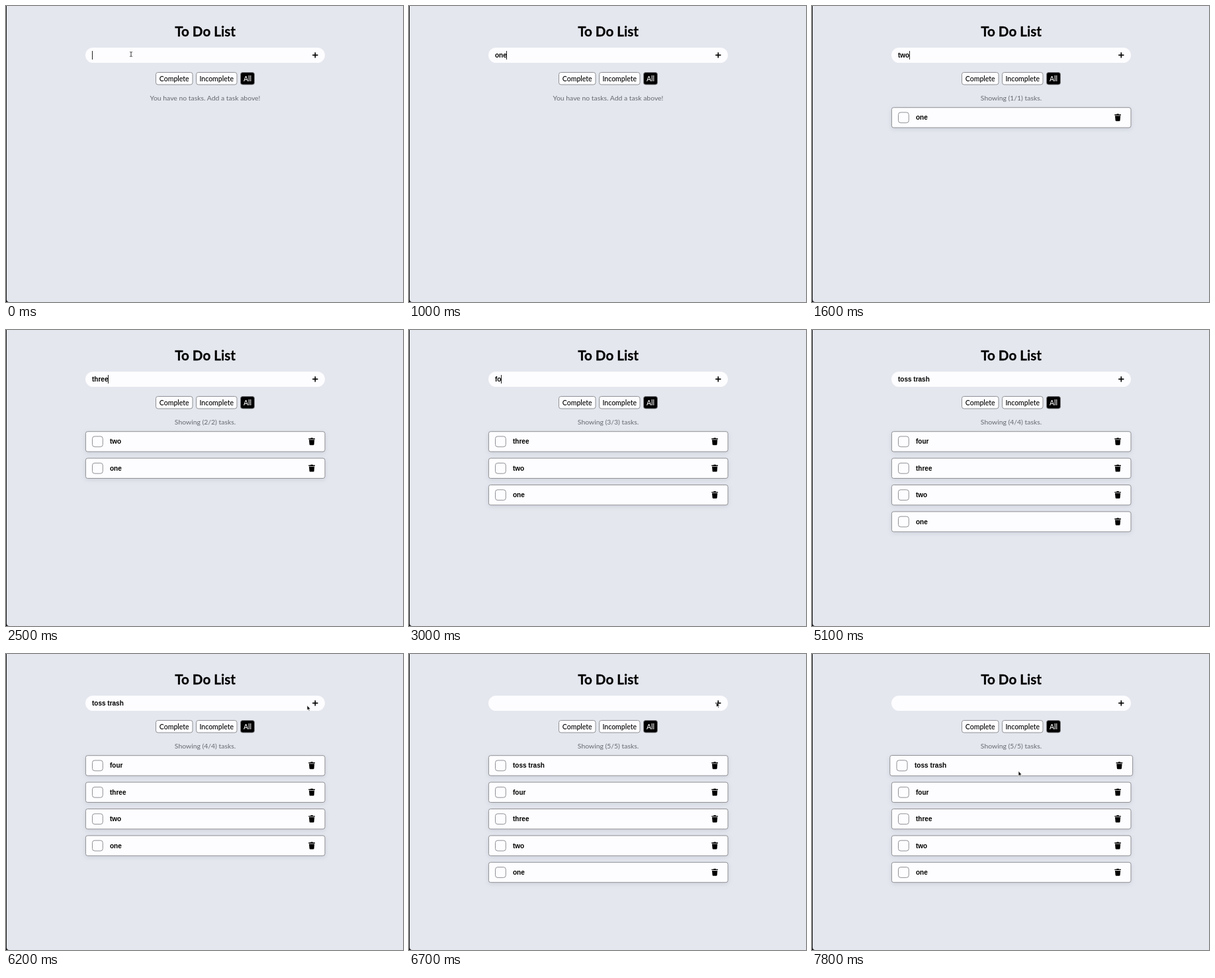
Write an HTML page that moves like this. It is 600x448 px and loops after 8000 ms.

```html
<!DOCTYPE html>
<html lang="en">
<head>
<meta charset="utf-8">
<title>To Do List</title>
<style>
  html, body { margin: 0; width: 100%; height: 100%; overflow: hidden; background: #111; }
  svg { display: block; width: 600px; height: 448px; }
  text { font: 500 10.5px Lato, "Open Sans", sans-serif; fill: #000; white-space: pre; }
  text.title { font-size: 20.6px; font-weight: 700; stroke: #000; stroke-width: .3px; }
  text.status { font-size: 10.4px; font-weight: 400; fill: #666a70; }
  text.task { font: bold 10px "Liberation Sans", Arial, sans-serif; }
  .mid { text-anchor: middle; }
  .box { fill: #fdfcfe; stroke: #85878c; stroke-width: .9px; }
  .card { filter: drop-shadow(0 2px 3px rgba(60, 70, 90, .13)); }
</style>
</head>
<body>
<svg viewBox="0 0 600 448">
  <path d="M1 0H600V448H5Q1 448 1 444Z" fill="#e4e7ee"/>
  <text class="title mid" x="301" y="45.5">To Do List</text>
  <rect x="120" y="63" width="362" height="23" rx="11.5" fill="#fdfcfe"/>
  <path d="M463.2 74.4h8.2M467.3 70.3v8.2" stroke="#000" stroke-width="1.6"/>
  <g id="buttons"></g>
  <text id="status" class="status mid" x="301" y="142.5"></text>
  <g id="list"></g>
  <text id="input" class="task" x="130" y="78"></text>
  <path id="caret" d="M0 68v13" stroke="#222" stroke-width="1"/>
  <path id="beam" d="M-1.8 -3.5Q0 -3.5 0 -2.5Q0 -3.5 1.8 -3.5M0 -2.5V2.5M-1.8 3.5Q0 3.5 0 2.5Q0 3.5 1.8 3.5"
        fill="none" stroke="#222" stroke-width=".9"/>
  <path id="arrow" d="M0 0V7.3L1.7 5.8L2.8 8.4L4 7.9L2.9 5.4H5.2Z" fill="#000" stroke="#fff" stroke-width=".7"/>
</svg>
<script>
const $ = id => document.getElementById(id);
const LOOP = 8000;

// [word, times of its keystrokes, time it is added]
const entries = [
  ["one", [800, 900, 1000], 1100],
  ["two", [1400, 1500, 1600], 1800],
  ["three", [2100, 2200, 2300, 2400, 2500], 2700],
  ["four", [2900, 3000, 3100, 3200], 3500],
  ["toss trash", [3700, 3800, 3900, 4000, 4100, 4300, 4300, 4400, 4500, 4600], 6700],
];
const caretOff = [[400, 800], [5100, 5600], [6100, LOOP]];

const clamp = v => Math.min(1, Math.max(0, v));
const ease = v => v * v * (3 - 2 * v);
const mix = (a, b, v) => a + (b - a) * v;

const button = (label, x, width, on) =>
  `<rect class="box" x="${x + .5}" y="100.5" width="${width - 1}" height="18.5" rx="3.2"${on ? ' style="fill:#000"' : ""}/>
   <text class="mid" x="${x + width / 2}" y="113.5"${on ? ' style="fill:#fff"' : ""}>${label}</text>`;
$("buttons").innerHTML = button("Complete", 226, 56.5) + button("Incomplete", 287, 62.5) + button("All", 354, 22, true);

const card = (label, row, scale) =>
  `<g transform="translate(301.2 ${168.9 + row * 40.4}) scale(${scale})">
    <rect class="box card" x="-180.8" y="-15.2" width="361.6" height="30.4" rx="3"/>
    <rect class="box" x="-170.7" y="-7.9" width="15.8" height="15.8" rx="3.5"/>
    <text class="task" x="-144.2" y="3.5">${label}</text>
    <path d="M156.1 -4.8h2.7l.8 -.8h2.6l.8 .8h2.7v1.4h-9.6zM156.8 -2.6h8.2l-.6 6.7q-.1 1.2 -1.3 1.2h-4.4q-1.2 0 -1.3 -1.2z"/>
  </g>`;

function pointer(t) {
  if (t < 800) return [189, 73];
  if (t < 5500) return null;
  if (t < 7100) {
    const v = ease(clamp((t - 5400) / 900)), u = 1 - v;
    return [mix(189, 464.5, v), u * u * 73 + 2 * u * v * 146 + v * v * 73];
  }
  const v = ease(clamp((t - 7000) / 600));
  return [mix(464.5, 312, v), mix(73, 177.3, v)];
}

function place(node, pos, show) {
  node.style.display = show ? "" : "none";
  if (show) node.setAttribute("transform", `translate(${pos})`);
}

let last = -1;
function draw(now) {
  const t = Math.floor(now % LOOP / 100) * 100;
  if (t !== last) {
    last = t;
    const done = entries.filter(e => t >= e[2]).map(e => e[0]).reverse();
    const [word, keys] = entries[done.length] || ["", []];
    const typed = word.slice(0, keys.filter(k => t >= k).length);
    const grow = 1 + .0145 * ease(clamp((t - 7400) / 300));

    $("status").textContent = done.length
      ? `Showing (${done.length}/${done.length}) tasks.` : "You have no tasks. Add a task above!";
    $("list").innerHTML = done.map((label, i) => card(label, i, i ? 1 : grow)).join("");
    $("input").textContent = typed;

    const end = typed ? $("input").getComputedTextLength() : 0;
    place($("caret"), [Math.floor(130 + end) + .5, 0], !caretOff.some(([a, b]) => t >= a && t < b));

    const pos = pointer(t);
    const overInput = pos && pos[1] < 86 && pos[0] < 455;
    place($("beam"), pos, pos && overInput);
    place($("arrow"), pos, pos && !overInput);
  }
  requestAnimationFrame(draw);
}
requestAnimationFrame(draw);
</script>
</body>
</html>
```
